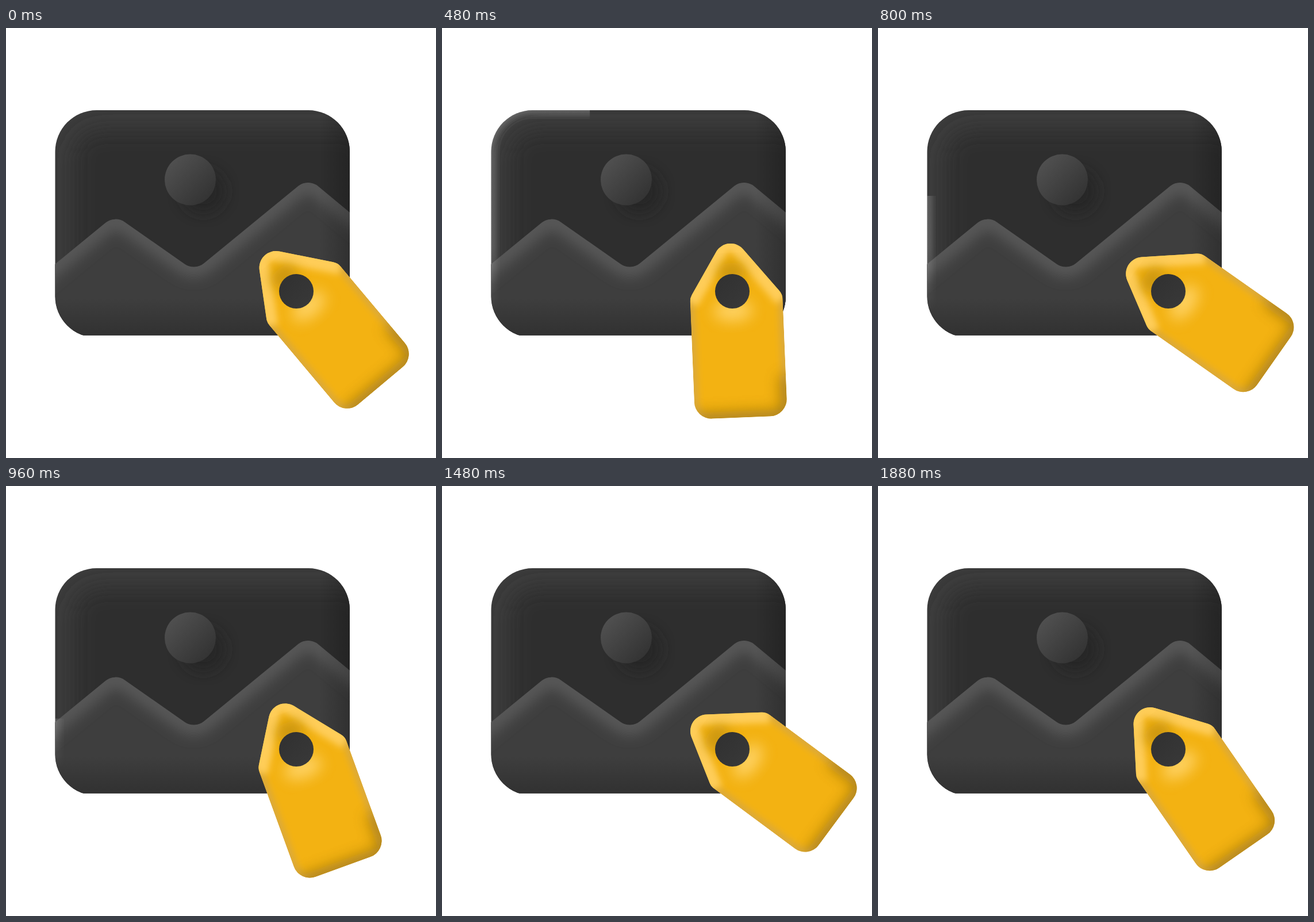
Animation of 748x748 px, one loop 1920 ms. Source, as an HTML page:

```html
<!DOCTYPE html>
<html lang="en">
<head>
<meta charset="utf-8">
<title>Picture with swinging tag</title>
<style>
  html, body { margin: 0; width: 100%; height: 100%; overflow: hidden; background: #fff; }
  svg { display: block; width: 100vw; height: 100vh; }
</style>
</head>
<body>
<svg viewBox="0 0 748 748">
  <defs>
    <filter id="soft6" x="-50%" y="-50%" width="200%" height="200%"><feGaussianBlur stdDeviation="6"/></filter>
    <filter id="soft12" x="-50%" y="-50%" width="200%" height="200%"><feGaussianBlur stdDeviation="12"/></filter>
    <filter id="soft18" x="-50%" y="-50%" width="200%" height="200%"><feGaussianBlur stdDeviation="18"/></filter>
    <clipPath id="trim"><rect width="748" height="534.6"/></clipPath>
    <clipPath id="cardClip"><rect x="85.5" y="143" width="512.5" height="395.6" rx="72"/></clipPath>
    <clipPath id="hillClip"><path class="hill"/></clipPath>
    <clipPath id="tagClip"><path class="tag"/></clipPath>
    <linearGradient id="sunFill" x1=".1" y1=".15" x2=".85" y2=".9">
      <stop offset="0" stop-color="#505050"/><stop offset="1" stop-color="#333"/>
    </linearGradient>
    <linearGradient id="rightShade" gradientUnits="userSpaceOnUse" x1="545" x2="598" y1="0" y2="0">
      <stop offset="0" stop-opacity="0"/><stop offset="1" stop-opacity=".22"/>
    </linearGradient>
    <linearGradient id="lowShade" gradientUnits="userSpaceOnUse" x1="0" x2="0" y1="470" y2="538">
      <stop offset="0" stop-opacity="0"/><stop offset="1" stop-opacity=".22"/>
    </linearGradient>
    <linearGradient id="shine" gradientUnits="userSpaceOnUse" x1="0" x2="0" y1="380" y2="495">
      <stop offset="0" stop-color="#fff"/><stop offset="1" stop-color="#fff" stop-opacity="0"/>
    </linearGradient>
    <linearGradient id="holeFill" x1="0" y1="0" x2="1" y2="1">
      <stop offset="0" stop-color="#303030"/><stop offset="1" stop-color="#393939"/>
    </linearGradient>
  </defs>

  <g clip-path="url(#trim)"><g clip-path="url(#cardClip)">
    <rect x="85" y="143" width="514" height="396" fill="#3c3c3c"/>
    <rect x="116" y="176" width="520" height="420" rx="50" fill="#2d2d2d" filter="url(#soft18)"/>
    <rect x="540" y="143" width="60" height="396" fill="url(#rightShade)"/>
    <circle cx="343" cy="284" r="38" fill="#222" opacity=".65" filter="url(#soft12)"/>
    <circle cx="320.5" cy="264" r="44.5" fill="url(#sunFill)"/>
    <g clip-path="url(#hillClip)">
      <path class="hill" fill="#3e3e3e"/>
      <path class="hill" fill="none" stroke="#595959" stroke-width="36" filter="url(#soft12)"/>
      <rect x="540" y="250" width="60" height="290" fill="url(#rightShade)"/>
      <rect x="85" y="460" width="514" height="80" fill="url(#lowShade)"/>
    </g>
    <g id="glare" fill="none" stroke="url(#shine)"></g>
  </g></g>

  <g id="swing">
    <g clip-path="url(#tagClip)">
      <path class="tag" fill="#f3b212"/>
      <path class="tag" fill="none" stroke="#d8a840" stroke-width="14" filter="url(#soft6)"/>
      <path d="M-74 16L-3.8 -98L87 16" fill="none" stroke="#ffcd58" stroke-width="30" filter="url(#soft6)"/>
      <path d="M-70 222H88V150" fill="none" stroke="#a97d0c" stroke-width="26" opacity=".85" filter="url(#soft12)"/>
      <ellipse cx="0" cy="-33" rx="24" ry="17" fill="#b98a10" opacity=".8" filter="url(#soft12)"/>
      <ellipse cx="0" cy="34" rx="34" ry="19" fill="#ffd469" opacity=".9" filter="url(#soft12)"/>
    </g>
  </g>
  <circle cx="505" cy="458" r="30" fill="url(#holeFill)"/>
</svg>

<script>
const LOOP = 1920, STEP = 40;
const PIVOT = '505 458';

// Closed polygon from [x, y, radius] corners.
function roundedPath(corners) {
  const count = corners.length;
  const parts = corners.map(([x, y, r], i) => {
    const [px, py] = corners[(i + count - 1) % count];
    const [nx, ny] = corners[(i + 1) % count];
    const inLen = Math.hypot(px - x, py - y), outLen = Math.hypot(nx - x, ny - y);
    const ax = (px - x) / inLen, ay = (py - y) / inLen;
    const bx = (nx - x) / outLen, by = (ny - y) / outLen;
    const cut = r / Math.tan(Math.acos(ax * bx + ay * by) / 2);
    const sweep = ax * by - ay * bx < 0 ? 1 : 0;
    return `${x + ax * cut} ${y + ay * cut}A${r} ${r} 0 0 ${sweep} ${x + bx * cut} ${y + by * cut}`;
  });
  return 'M' + parts.join('L') + 'Z';
}

function setPath(selector, corners) {
  const d = roundedPath(corners);
  document.querySelectorAll(selector).forEach(el => el.setAttribute('d', d));
}

setPath('.hill', [
  [45, 443.8, 1], [189.3, 325.5, 28], [328, 422.6, 28], [525.5, 260.8, 28],
  [640, 356, 1], [640, 600, 1], [45, 600, 1]
]);
setPath('.tag', [
  [-3.8, -104.3, 29], [87, 9, 24], [87, 220, 30], [-74, 220, 30], [-74, 9, 24]
]);

// Stacked strokes give a soft band whose ends stay crisp.
const glare = document.getElementById('glare');
const bands = [5, 10, 16, 22, 30].map(width => {
  const band = document.createElementNS('http://www.w3.org/2000/svg', 'path');
  band.setAttribute('d', 'M528 143H157.5A72 72 0 0 0 85.5 215V495');
  band.setAttribute('stroke-width', width);
  band.setAttribute('stroke-opacity', .045);
  glare.append(band);
  return band;
});

// [time, tilt] at each turning point of the swing.
const turns = [[-90, 33.3], [205, 50.6], [455, 0], [673, 73], [1000, 18], [1310, 60], [1825, 33.3], [2125, 50.6]];
turns[0] = [0, 40];

function tiltAt(t) {
  const i = turns.findIndex(([time]) => time > t);
  const [t0, a] = turns[i - 1], [t1, b] = turns[i];
  return a + (b - a) * (1 - Math.cos(Math.PI * (t - t0) / (t1 - t0))) / 2;
}

function smooth(u) {
  const v = Math.min(1, Math.max(0, u));
  return v * v * (3 - 2 * v);
}

const swing = document.getElementById('swing');

function draw(t) {
  swing.setAttribute('transform', `translate(${PIVOT}) rotate(${-tiltAt(t)})`);
  const tail = 5 + 735 * smooth(t / 1180);
  const head = 764 * smooth(t / 470);
  const visible = t > 0 && t < 1160 && head > tail;
  glare.style.display = visible ? '' : 'none';
  if (visible) {
    bands.forEach(band => band.setAttribute('stroke-dasharray', `0 ${tail} ${head - tail} 2000`));
  }
}

let start;
function tick(now) {
  start ??= now;
  const t = (now - start) % LOOP;
  draw(Math.floor(t / STEP) * STEP);
  requestAnimationFrame(tick);
}
draw(0);
requestAnimationFrame(tick);
</script>
</body>
</html>
```
